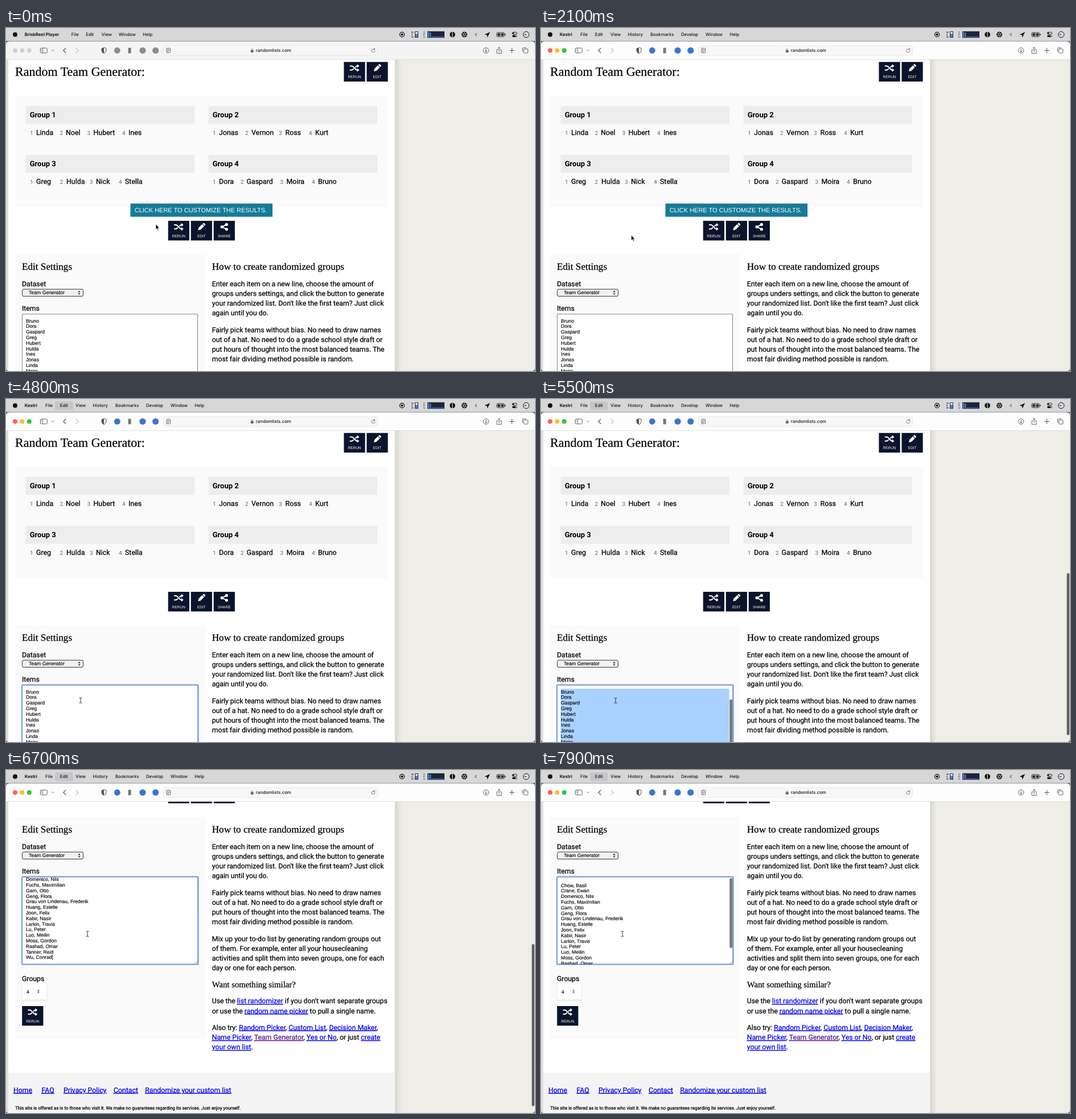
Write an HTML page that moves like this. It is 929 by 603 pixels and loops after 8000 ms.

```html
<!DOCTYPE html>
<html lang="en">
<head>
<meta charset="utf-8">
<title>Random Team Generator</title>
<style>
html, body { margin: 0; width: 100%; height: 100%; overflow: hidden; background: #8a94a6; }
svg { display: block; width: 929px; height: 603px; }
text { white-space: pre; text-rendering: geometricPrecision; }
.body, .head, .dark { stroke: #000; stroke-width: .25px; }
.body { font-family: Roboto, sans-serif; font-size: 12.25px; }
.head { font-family: "Liberation Serif", serif; font-size: 17.15px; }
.arial { font-family: "Liberation Sans", sans-serif; font-size: 8.6px; }
.dark { stroke-width: .15px; }
.ui { font-family: Inter, sans-serif; font-size: 7.7px; font-weight: 500; fill: #161616; }
.link { fill: #0000ee; stroke: #0000ee; text-decoration: underline; }
.seen { fill: #551a8b; stroke: #551a8b; }
.num { font-size: 10px; fill: #666; stroke: none; }
</style>
</head>
<body>
<svg id="stage" viewBox="0 0 929 603"></svg>
<script>
const LOOP = 8000, STEP = 100;
const PAGE_SHIFT = 315, LINE = 17.25, ROW = 9.8;

// Drawing helpers
const text = (x, y, s, cls = 'body', more = '') => `<text x="${x}" y="${y}" class="${cls}" ${more}>${s}</text>`;
const rect = (x, y, w, h, fill, more = '') => `<rect x="${x}" y="${y}" width="${w}" height="${h}" fill="${fill}" ${more}/>`;
const circle = (x, y, r, fill, more = '') => `<circle cx="${x}" cy="${y}" r="${r}" fill="${fill}" ${more}/>`;
const line = (d, color = '#4a4a4a', w = 1) =>
  `<path d="${d}" fill="none" stroke="${color}" stroke-width="${w}" stroke-linecap="round" stroke-linejoin="round"/>`;
const group = (id, inner, more = '') => `<g id="${id}" ${more}>${inner}</g>`;
const at = (x, y, inner) => `<g transform="translate(${x} ${y})">${inner}</g>`;
const link = (s, cls = '') => `<tspan class="link ${cls}">${s}</tspan>`;
const lines = (x, y, list) => list.map((s, i) => text(x, y + i * LINE, s)).join('');

const icons = {
  RERUN: line('M-7.5-3.6H-5C-1.5-3.6 1.5 3.6 4.5 3.6H5.5M-7.5 3.6H-5C-3.6 3.6-2.8 2.8-2 1.7M2-1.7C2.8-2.8 3.5-3.6 4.5-3.6H5.5', '#fff', 2) +
    '<path d="M4.6-6.8L8.4-3.6L4.6-.4ZM4.6.4L8.4 3.6L4.6 6.8Z" fill="#fff"/>',
  EDIT: '<path transform="rotate(-45)" d="M-8.4 0L-4.6-2.5H4V2.5H-4.6ZM5-2.5H6.6Q8-2.5 8-1.2V1.2Q8 2.5 6.6 2.5H5Z" fill="#fff"/>',
  SHARE: line('M4-4.2L-4 0L4 4.2', '#fff', 1.8) +
    circle(4, -4.2, 2.6, '#fff') + circle(-4.2, 0, 2.6, '#fff') + circle(4, 4.2, 2.6, '#fff')
};
const button = (x, y, label) => at(x, y,
  rect(0, 0, 37.2, 34.5, '#0b142c') + at(18.6, 10.6, icons[label]) +
  text(18.6, 28.7, label, 'arial', 'text-anchor="middle" fill="#fff" style="font-size:6.5px"'));

const stepper = (x, y) => at(x, y, '<path d="M-2-1L0-3.6L2-1ZM-2 1L0 3.6L2 1Z" fill="#222"/>');

// Page
const teams = [
  [34.5, 137, 'Group 1', [[42, 53, 'Linda'], [94.5, 105, 'Noel'], [142.5, 153.5, 'Hubert'], [204, 215, 'Ines']]],
  [355.5, 137, 'Group 2', [[363, 374, 'Jonas'], [420, 431, 'Vernon'], [479, 490.5, 'Ross'], [532, 543, 'Kurt']]],
  [34.5, 223, 'Group 3', [[42, 53, 'Greg'], [94.5, 106, 'Hulda'], [147, 158, 'Nick'], [198, 209, 'Stella']]],
  [355.5, 223, 'Group 4', [[363, 374, 'Dora'], [412, 422.5, 'Gaspard'], [481.5, 492.5, 'Moira'], [537, 548, 'Bruno']]]
];
const firstList = ['Bruno', 'Dora', 'Gaspard', 'Greg', 'Hubert', 'Hulda', 'Ines', 'Jonas', 'Linda', 'Moira'];
const newList = ['', 'Chow, Basil', 'Crane, Ewan', 'Domenico, Nils', 'Fuchs, Maximilian', 'Garn, Otto', 'Geng, Flora',
  'Grau von Lindenau, Frederik', 'Huang, Estelle', 'Joon, Felix', 'Kabir, Nasir', 'Larkin, Travis', 'Lu, Peter',
  'Luo, Meilin', 'Moss, Gordon', 'Rashad, Omar', 'Tanner, Reid', 'Wu, Conrad'];
const rows = list => list.map((s, i) => text(35, 517.6 + i * ROW, s, 'arial dark',
  i === newList.length - 1 ? 'id="lastRow"' : '')).join('');

const team = ([x, y, title, people]) =>
  rect(x, y, 296.5, 31.5, '#ededed') +
  text(x + 7.2, y + 20.2, title, 'body', 'style="font-size:13px;font-weight:700;stroke:none"') +
  people.map(([nx, px, name], i) =>
    text(nx, y + 51, i + 1, 'body num') +
    text(px, y + 51, name, 'body', 'style="font-size:12.4px"')).join('');

const settings =
  rect(16, 398, 333.5, 390, '#fafafa') +
  text(28, 425, 'Edit Settings', 'head') +
  text(28, 453.6, 'Dataset') +
  rect(28.5, 459.2, 107, 12.4, '#f1f1f1', 'rx="2.5" stroke="#333"') +
  text(40, 468.4, 'Team Generator', 'arial dark', 'style="font-size:8.7px"') + stepper(128.5, 465.4) +
  text(28, 497.4, 'Items') +
  rect(28.5, 503, 308, 154, '#fff', 'stroke="#858585"') +
  group('ring', rect(28, 502.6, 309.5, 154, 'none', 'rx="1.5" stroke="#7fa6e3" stroke-width="2.4"')) +
  `<g clip-path="url(#box)">` +
    group('select', rect(34.5, 509.3, 296, 160, '#a9d1ff')) +
    group('oldRows', rows(firstList)) +
    group('newRows', rows(newList) + rect(0, 676.4, .8, 9.6, '#111', 'id="caret"')) +
    rect(331.3, 505, 4.6, 123, '#777', 'id="thumb" rx="2.3"') +
  '</g>' +
  line('M332 654.8L335.6 651.2M334.2 654.9L335.6 653.5', '#777', .7) +
  text(28, 685.5, 'Groups') +
  rect(28.5, 691.5, 42.5, 27, '#fff', 'filter="url(#soft)"') +
  text(36, 707.6, '4', 'arial dark') +
  rect(54.3, 699.5, 5.4, 9.5, '#f2f2f2', 'rx="2.5"') + at(57, 704.3, '<g transform="scale(.75)">' + stepper(0, 0) + '</g>') +
  button(28.2, 730, 'RERUN');

const guide =
  text(361.7, 425, 'How to create randomized groups', 'head') +
  lines(361.7, 453.6, ['Enter each item on a new line, choose the amount of',
    'groups unders settings, and click the button to generate',
    "your randomized list. Don't like the first team? Just click", 'again until you do.']) +
  lines(361.7, 534.6, ['Fairly pick teams without bias. No need to draw names',
    'out of a hat. No need to do a grade school style draft or',
    'put hours of thought into the most balanced teams. The', 'most fair dividing method possible is random.']) +
  lines(361.7, 615.6, ['Mix up your to-do list by generating random groups out',
    'of them. For example, enter all your housecleaning',
    'activities and split them into seven groups, one for each', 'day or one for each person.']) +
  text(361.7, 696.6, 'Want something similar?', 'head', 'style="font-size:14.75px"') +
  lines(361.7, 725.3, [`Use the ${link('list randomizer')} if you don't want separate groups`,
    `or use the ${link('random name picker')} to pull a single name.`]) +
  lines(361.7, 771.8, [`Also try: ${link('Random Picker')}, ${link('Custom List')}, ${link('Decision Maker')},`,
    `${link('Name Picker')}, ${link('Team Generator', 'seen')}, ${link('Yes or No')}, or just ${link('create')}`,
    `${link('your own list')}.`]);

const footer = rect(4, 847, 679, 90, '#f4f4f4') +
  [[13, 'Home'], [62.5, 'FAQ'], [101, 'Privacy Policy'], [189, 'Contact'], [244.3, 'Randomize your custom list']]
    .map(([x, s]) => text(x, 881.8, link(s))).join('') +
  text(16, 911.8, 'This site is offered as is to those who visit it. We make no guarantees regarding its services. Just enjoy yourself.',
    'body', 'style="font-size:8px"');

const page = group('page',
  text(16, 83.6, 'Random Team Generator:', 'head', 'style="font-size:22px"') +
  button(593.4, 59.7, 'RERUN') + button(633.4, 59.7, 'EDIT') +
  rect(16, 118.5, 655, 196, '#fafafa') + teams.map(team).join('') +
  group('banner', rect(218.5, 308.6, 249.5, 23.2, '#167a99') +
    text(225.7, 324, 'CLICK HERE TO CUSTOMIZE THE RESULTS.', 'arial', 'fill="#fff" style="font-size:11px"')) +
  button(284.7, 339, 'RERUN') + button(324.7, 339, 'EDIT') + button(364.7, 339, 'SHARE') +
  settings + guide + footer);

// Menu bar
const menu = (id, items) => group(id, items.map(([x, s], i) =>
  text(x, 14.4, s, 'ui', i ? '' : 'style="font-weight:700"')).join(''));

const status =
  circle(695.5, 11.5, 4.1, 'none', 'stroke="#111" stroke-width="1.2"') + circle(695.5, 11.5, 2.1, '#111') +
  ['M', 'E', 'M'].map((s, i) => text(712, 9 + i * 4, s, 'ui', 'style="font-size:4px"')).join('') +
  rect(718, 6, 6, 11, '#27324f') + rect(719, 7, 4, 3.5, '#dfe3ee') + rect(719, 11, 4, 5, '#4c79d8') +
  ['C', 'P', 'U'].map((s, i) => text(733, 9 + i * 4, s, 'ui', 'style="font-size:4px"')).join('') +
  rect(740, 5.8, 30, 11.4, '#1d2438') + rect(741, 7, 2, 9.4, '#5b8be6') + rect(744, 8, 2.5, 8.4, '#4c6fc0') +
  line('M748 15.6H768.5', '#41609f', 1.6) +
  circle(784, 11.5, 4.8, '#111') + line('M784 7V16', '#ddd', 1.2) +
  circle(805, 11.5, 5, '#151515') + [0, 60, 120, 180, 240, 300].map(a =>
    `<path transform="translate(805 11.5) rotate(${a})" d="M-1-1.8L4.3-1.8" stroke="#ddd" stroke-width=".7"/>`).join('') +
  line('M826.3 9.2L824 11.5L826.3 13.8', '#111') +
  '<path d="M850 7L840.3 11.6L844.5 12.3L845.4 16.8Z" fill="#111"/>' +
  rect(861.8, 8, 13.4, 7.2, 'none', 'rx="2" stroke="#222"') + rect(863.2, 9.4, 10.6, 4.4, '#222', 'rx="1"') +
  rect(876.2, 10.2, 1.2, 2.8, '#222') + line('M869.5 8.5L867.5 11.8H870L868.3 14.6', '#ddd', .9) +
  rect(889, 7.4, 8.4, 3.6, 'none', 'rx="1.8" stroke="#111" stroke-width=".9"') + circle(891, 9.2, 1.2, '#111') +
  rect(889, 12.4, 8.4, 3.6, '#111', 'rx="1.8"') + circle(895.5, 14.2, 1.1, '#ddd') +
  circle(913.5, 11.5, 5.2, 'none', 'stroke="#111"') + line('M910.8 11.5H913.5', '#111');

const menuBar = rect(0, 0, 929, 22.8, '#d7d7d8') + circle(16, 11.5, 4, '#111') +
  rect(86, 4, 31.6, 15.4, '#c6c6c8', 'id="menuOn" rx="3"') +
  menu('idleMenu', [[32.7, 'BriskReel Player'], [114.8, 'File'], [140.3, 'Edit'], [167.8, 'View'], [198, 'Window'], [240.3, 'Help']]) +
  menu('liveMenu', [[32.7, 'Kestri'], [69, 'File'], [94.8, 'Edit'], [122, 'View'], [152.5, 'History'], [192, 'Bookmarks'],
    [246, 'Develop'], [289, 'Window'], [331.3, 'Help']]) + status;

// Toolbar
const extras = color => circle(195.3, 39.5, 5.4, color) + circle(240, 39.5, 5.6, color) + circle(262.7, 39.5, 5.6, color);
const lamps = colors => colors.map((c, i) => circle(16 + i * 12.4, 39.5, 4, c)).join('');
const toolbar =
  group('idleBar', rect(0, 23, 929, 32, '#f4f4f4') + lamps(['#d0d0d0', '#d0d0d0', '#d0d0d0']) + extras('#8d8d8d')) +
  group('liveBar', rect(0, 23, 929, 32, '#fdfdfd') + lamps(['#fe5f57', '#febc2e', '#28c840']) + extras('#3d73cf')) +
  rect(0, 55, 929, .8, '#dadada') +
  rect(60.3, 35.2, 12, 8.6, 'none', 'rx="1.8" stroke="#666"') + line('M64.6 35.5V43.5M62 37.6H63M62 39.5H63', '#666', .8) +
  line('M80.4 38.6L82.3 40.4L84.2 38.6', '#777') +
  line('M105 35.4L100.8 39.5L105 43.6', '#555', 1.2) + line('M123 35.4L127.2 39.5L123 43.6', '#c4c4c4', 1.2) +
  line('M172 34.6L168 36V40Q168 43 172 44.8Q176 43 176 40V36Z', '#555') +
  '<path d="M172 34.6L168 36V40Q168 43 172 44.8Z" fill="#555"/>' +
  rect(214.6, 34.8, 5, 9.6, '#777') +
  rect(276.5, 31, 376, 17, '#f7f7f7', 'rx="3.5" stroke="#e2e2e2" stroke-width=".8"') +
  rect(282, 35.5, 6.6, 8, 'none', 'rx="1" stroke="#555" stroke-width=".9"') + line('M283.7 38H287M283.7 39.7H287M283.7 41.4H285.5', '#555', .7) +
  rect(429.7, 39, 5, 4, '#666', 'rx=".7"') + line('M430.9 39V37.6Q432.2 35.4 433.5 37.6V39', '#666', .9) +
  text(438.8, 42.3, 'randomlists.com', 'ui', 'style="font-size:7.8px"') +
  line('M647 37.6A3 3 0 1 0 648 39.8M647.4 35.7V37.9H645.2', '#666', .9) +
  circle(843, 39.5, 4.8, 'none', 'stroke="#555" stroke-width=".9"') + line('M843 37V42M841 40.2L843 42.2L845 40.2', '#555', .9) +
  line('M864.2 38.2H862V44.6H870V38.2H867.8M866 42V34M864 35.8L866 33.8L868 35.8', '#555', .9) +
  line('M884.4 39.5H892.4M888.4 35.5V43.5', '#555', 1) +
  line('M907.2 41.2V36Q907.2 34.8 908.4 34.8H913.6', '#555', .9) + rect(909.2, 36.8, 7.4, 7.2, 'none', 'rx="1.2" stroke="#555" stroke-width=".9"');

const defs = `<defs>
<clipPath id="box"><rect x="28.5" y="503.5" width="308" height="153"/></clipPath>
<clipPath id="view"><rect y="55" width="929" height="548"/></clipPath>
<clipPath id="win"><path d="M0 29.6Q0 23.6 6 23.6H923Q929 23.6 929 29.6V597Q929 603 923 603H6Q0 603 0 597Z"/></clipPath>
<linearGradient id="shade"><stop stop-color="#d6d6ce"/><stop offset="1" stop-color="#eeeee6"/></linearGradient>
<filter id="soft" x="-20%" y="-20%" width="140%" height="150%"><feDropShadow dx="0" dy=".8" stdDeviation=".8" flood-opacity=".18"/></filter>
</defs>`;

document.getElementById('stage').innerHTML = defs + rect(0, 0, 929, 603, '#5f6a7c') + menuBar +
  `<g clip-path="url(#win)"><g clip-path="url(#view)">` +
  rect(0, 55, 929, 548, '#eeeee6') + rect(0, 55, 4, 548, '#dfdfd8') + rect(683, 55, 12, 548, 'url(#shade)') +
  rect(4, 55, 679, 548, '#fff') + page +
  rect(923.4, 306, 4.6, 285, '#606064', 'id="bar" rx="2.3"') + '</g>' + toolbar + '</g>' +
  group('arrow', '<path d="M0 0V9.3L2.1 7.3L3.6 10.7L5.1 10L3.6 6.8H6.5Z" fill="#000" stroke="#fff" stroke-width=".7"/>') +
  group('beam', line('M-2-4.6Q0-4.6 0-3.6Q0-4.6 2-4.6M0-3.6V3.6M-2 4.6Q0 4.6 0 3.6Q0 4.6 2 4.6', '#222', .9));

// Motion: [time, value...]
const pointer = [[0, 263, 345], [100, 263, 345], [800, 160, 365], [1900, 160, 365], [2200, 158, 364], [2400, 158, 364],
  [2600, 128, 340], [3100, 146, 99], [3200, 147, 98], [3500, 149, 98], [4300, 131, 530], [5800, 131, 530], [6600, 143, 288], [LOOP, 143, 288]];
const listScroll = [[0, 36.7], [6800, 36.7], [7900, 6.8], [LOOP, 6.8]];
const barFade = [[0, 0], [5400, 0], [5500, 1], [6700, 1], [7000, 0], [LOOP, 0]];

const ease = p => p * p * (3 - 2 * p);
function track(keys, t) {
  const i = Math.max(1, keys.findIndex(k => k[0] > t));
  const a = keys[i - 1], b = keys[i], p = ease((t - a[0]) / (b[0] - a[0]));
  return a.slice(1).map((v, n) => v + (b[n + 1] - v) * p);
}

const el = id => document.getElementById(id);
const show = (id, on) => el(id).style.display = on ? '' : 'none';
const move = (id, x, y) => el(id).setAttribute('transform', `translate(${x} ${y})`);
el('caret').setAttribute('x', 35.4 + el('lastRow').getComputedTextLength());

function draw(t) {
  const live = t >= 600, focus = t >= 4300, pasted = t >= 5600;
  show('idleMenu', !live); show('liveMenu', live);
  show('idleBar', !live); show('liveBar', live);
  show('menuOn', t >= 4700);
  show('ring', focus); show('banner', !focus);
  show('select', t >= 4900 && !pasted);
  show('oldRows', !pasted); show('newRows', pasted);
  move('page', 0, pasted ? -PAGE_SHIFT : 0);

  const [scroll] = track(listScroll, t);
  move('newRows', 0, -scroll);
  show('thumb', t === 5500 || t >= 6800);
  move('thumb', 0, (scroll - 6.8) * 23 / 29.9);
  el('bar').style.opacity = track(barFade, t)[0];

  const [x, y] = track(pointer, t);
  const beam = t >= 4200 && y > 503 && t < 5900 || t >= 5900 && y < 343;
  show('beam', beam); show('arrow', !beam);
  move(beam ? 'beam' : 'arrow', x, y);
}

const start = performance.now();
function tick(now) {
  draw(Math.floor(Math.max(0, now - start) % LOOP / STEP) * STEP);
  requestAnimationFrame(tick);
}
draw(0);
requestAnimationFrame(tick);
</script>
</body>
</html>
```
